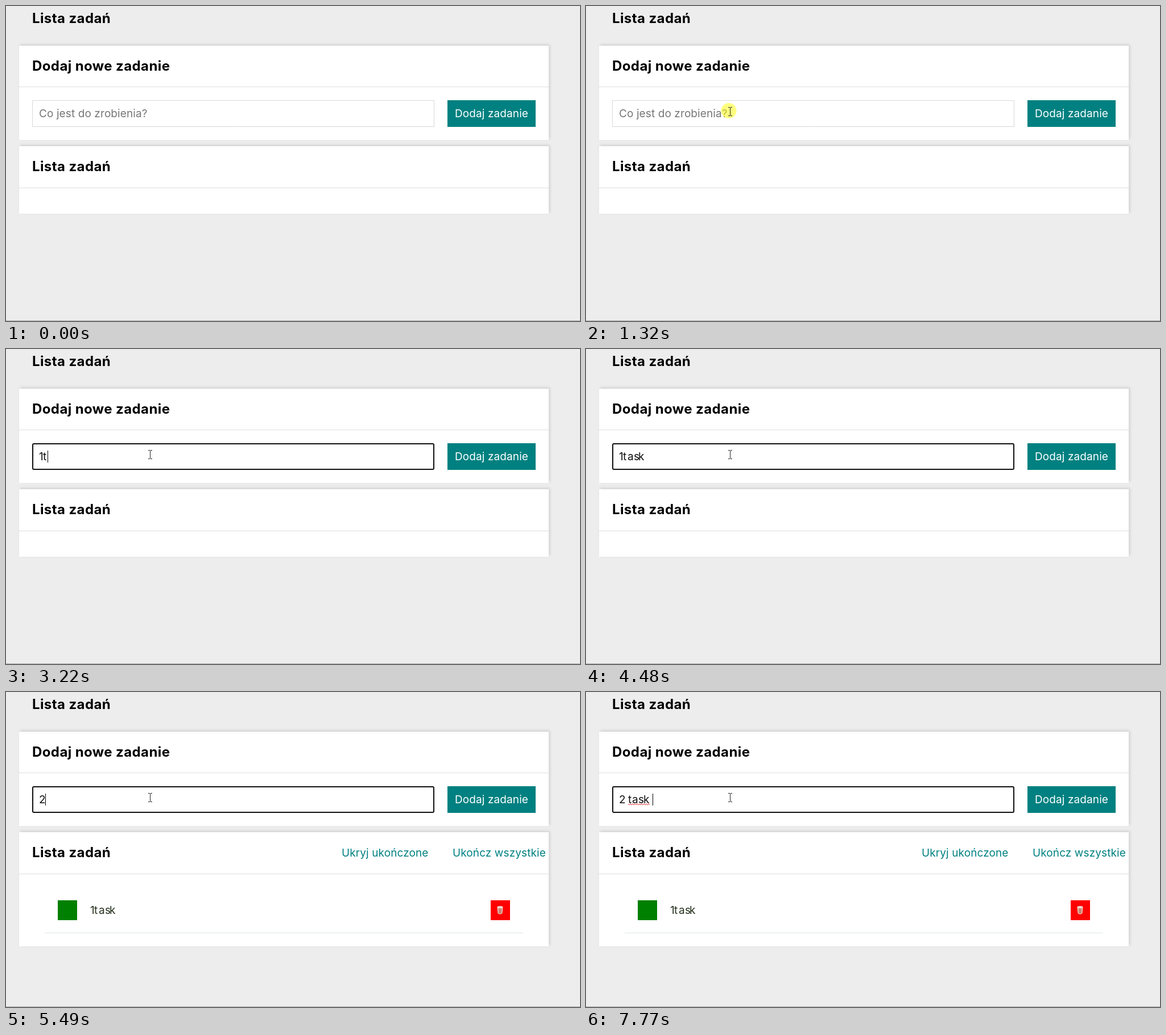
Recreate the animation shown at these times as an HTML page with a canvas. Size 1009 px wide and 555 px high, loop 8000 ms.

```html
<!DOCTYPE html>
<html lang="pl">
<head>
<meta charset="utf-8">
<title>Lista zadań</title>
<style>
  html, body { margin: 0; width: 100%; height: 100%; overflow: hidden; background: #ededed; }
  canvas { display: block; }
</style>
</head>
<body>
<canvas id="stage" width="1009" height="555"></canvas>
<script>
const ctx = document.getElementById('stage').getContext('2d');
const LOOP = 8000;
const TEAL = '#008080';
const BODY = { font: '400 19px Inter, "Open Sans", sans-serif', spacing: '0.1px' };
const HEAD = { font: '700 24px Inter, "Open Sans", sans-serif', spacing: '0.4px' };

// cursor travel
const MOVE = 220, STEP = 68.7, STEPS = 16, FOCUS = 1410, ADDED = 4680;

// key presses: time, character, caret position afterwards
const FIRST = [
  [1880, '1', 65], [3220, 't', 73], [3420, 'a', 84], [3750, 's', 92], [3950, 'k', 103]
];
const SECOND = [
  [5490, '2', 69], [6150, ' ', 74], [6750, 't', 81], [7020, 'a', 92],
  [7220, 's', 101], [7420, 'k', 112], [7710, ' ', 117]
];
const BLINKS = [[2410, 2940], [4480, 5010], [6030, 6150]];
const SPELLCHECK = 7770;

function rect(x, y, w, h, color) {
  ctx.fillStyle = color;
  ctx.fillRect(x, y, w, h);
}

function text(str, x, y, color = '#000', style = BODY, align = 'left') {
  ctx.font = style.font;
  ctx.letterSpacing = style.spacing;
  ctx.textAlign = align;
  ctx.fillStyle = color;
  ctx.fillText(str, x, y);
}

function card(y, h, line, title) {
  ctx.save();
  ctx.shadowColor = 'rgba(0,0,0,.13)';
  ctx.shadowBlur = 5;
  ctx.shadowOffsetX = 2;
  ctx.shadowOffsetY = -2;
  rect(23, y, 931, h, '#fff');
  ctx.restore();
  rect(23, line, 931, 1, '#dedede');
  text(title, 46, y + 44, '#000', HEAD);
}

// draws the pressed keys and returns the caret position
function typed(keys, t, dx = 0, y = 196, color = '#111') {
  let x = 58;
  for (const [at, ch, next] of keys) {
    if (t < at) break;
    text(ch, x + dx, y, color);
    x = next;
  }
  return x;
}

function squiggle(x0, x1, y) {
  ctx.strokeStyle = '#e8252b';
  ctx.lineWidth = 1;
  ctx.beginPath();
  for (let x = x0, i = 0; x <= x1; x += 2, i++) ctx.lineTo(x, y + (i % 2 ? 1 : -1));
  ctx.stroke();
}

function field(t) {
  const focused = t >= FOCUS;
  ctx.lineWidth = focused ? 2 : 1;
  ctx.strokeStyle = focused ? '#101010' : '#d8d8d8';
  const inset = ctx.lineWidth / 2;
  ctx.beginPath();
  ctx.roundRect(46 + inset, 166 + inset, 707 - 2 * inset, 47 - 2 * inset, focused ? 2 : 0);
  ctx.stroke();

  const keys = t < ADDED ? FIRST : SECOND;
  if (t < keys[0][0]) text('Co jest do zrobienia?', 58, 196, '#757575');
  const x = typed(keys, t);
  if (t >= SPELLCHECK) squiggle(74, 112, 198);
  const hidden = BLINKS.some(([a, b]) => t >= a && t < b);
  if (focused && !hidden) rect(x === 58 ? 59 : x, 179, 1, 21, '#000');
}

function bin(x, y) {
  ctx.fillStyle = '#e9c3b6';
  ctx.strokeStyle = '#b5523f';
  ctx.lineWidth = 1;
  ctx.beginPath();
  ctx.moveTo(x - 5, y - 5);
  ctx.lineTo(x - 4, y + 6);
  ctx.quadraticCurveTo(x, y + 9, x + 4, y + 6);
  ctx.lineTo(x + 5, y - 5);
  ctx.fill();
  ctx.beginPath();
  for (const d of [-2, 0, 2]) {
    ctx.moveTo(x + d, y - 3);
    ctx.lineTo(x + d * .8, y + 6);
  }
  ctx.stroke();
  ctx.fillStyle = '#f1d8cf';
  ctx.beginPath();
  ctx.ellipse(x, y - 5, 5, 2, 0, 0, 2 * Math.PI);
  ctx.fill();
}

function task() {
  text('Ukryj ukończone', 590, 290, TEAL);
  text('Ukończ wszystkie', 785, 290, TEAL);
  rect(91, 367, 34, 35, '#008000');
  typed(FIRST, ADDED, 90, 391, '#26321f');
  rect(852, 367, 34, 35, '#f00');
  bin(868.5, 384);
  rect(68, 424, 841, 1, '#dfe6e3');
}

function arrow(x, y) {
  const outline = [[0, 0], [0, 16], [4, 12.5], [6.5, 18], [9, 17], [6.5, 11.5], [11.5, 11.5]];
  ctx.beginPath();
  for (const [dx, dy] of outline) ctx.lineTo(x + dx, y + dy);
  ctx.closePath();
  ctx.fillStyle = '#fff';
  ctx.strokeStyle = '#000';
  ctx.lineWidth = 1;
  ctx.fill();
  ctx.stroke();
}

function beam(x, y) {
  rect(x, y - 7, 1, 14, '#222');
  for (const dy of [-8, 7]) {
    rect(x - 3, y + dy, 3, 1, '#222');
    rect(x + 1, y + dy, 3, 1, '#222');
  }
}

function cursor(t) {
  if (t < MOVE) return;
  const k = Math.min(STEPS, Math.floor((t - MOVE) / STEP));
  const e = (1 - Math.cos(Math.PI * k / STEPS)) / 2;
  const x = Math.round(789 - 537 * e);
  const y = Math.round(458 - 273 * e - 50 * e * (1 - e));
  if (t < FOCUS) {
    ctx.fillStyle = 'rgba(255,255,0,.5)';
    ctx.beginPath();
    ctx.arc(x - 1, y - .5, 13.5, 0, 2 * Math.PI);
    ctx.fill();
  }
  if (x < 753 && y > 166 && y < 213) beam(x + 1, y + 1);
  else arrow(x + .5, y + .5);
}

function draw(t) {
  const added = t >= ADDED;
  rect(0, 0, 1009, 555, '#ededed');
  rect(0, 554, 1009, 1, '#ababab');
  text('Lista zadań', 46, 30, '#000', HEAD);
  card(70, 166, 142, 'Dodaj nowe zadanie');
  card(247, added ? 201 : 119, 320, 'Lista zadań');
  rect(776, 166, 155, 47, TEAL);
  text('Dodaj zadanie', 853.5, 196, '#fff', BODY, 'center');
  field(t);
  if (added) task();
  cursor(t);
}

const start = performance.now();
function tick() {
  draw((performance.now() - start) % LOOP);
  requestAnimationFrame(tick);
}
tick();
</script>
</body>
</html>
```
